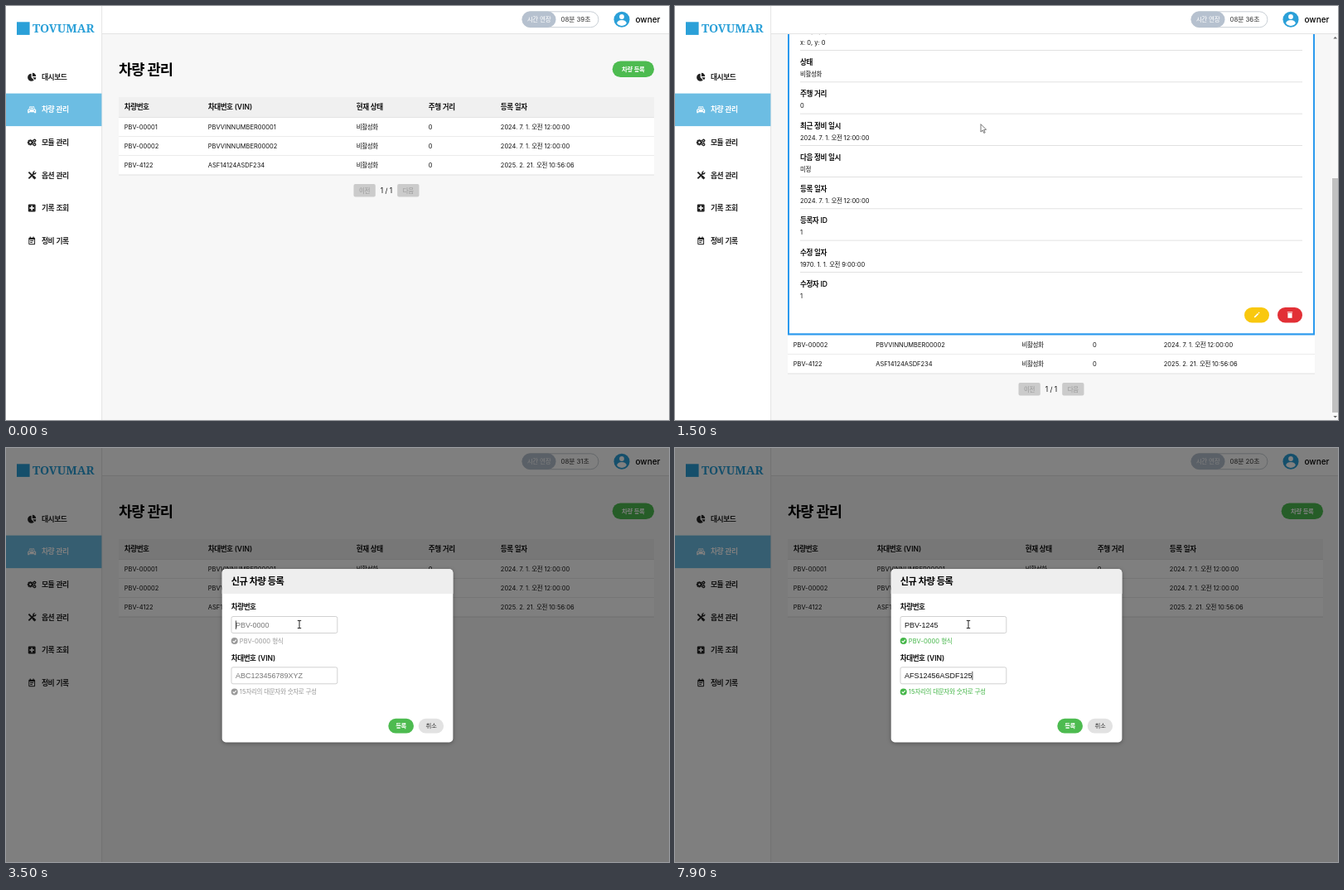
An HTML page with a canvas that plays this animation: 800 px wide and 500 px high, repeating every 8 s.

```html
<!DOCTYPE html>
<html lang="ko">
<head>
<meta charset="utf-8">
<title>차량 관리</title>
<style>
html, body { margin: 0; width: 100%; height: 100%; overflow: hidden; background: #f7f7f7; }
canvas { display: block; width: 800px; height: 500px; }
</style>
</head>
<body>
<canvas id="stage"></canvas>
<script>
const canvas = document.getElementById('stage');
const ctx = canvas.getContext('2d');
const ratio = window.devicePixelRatio || 1;
canvas.width = 800 * ratio;
canvas.height = 500 * ratio;

const LOOP = 8000, STEP = 100;
const UI = 'Inter, "Noto Sans CJK KR", "Noto Sans CJK", sans-serif';
const FIELD = '"Liberation Sans", Arial, sans-serif';
const BLUE = '#2ba0d8', GREEN = '#4dbb50', INK = '#111';

// Event times in ms
const OPEN_ROW = 400, RELOAD = 1800, MODAL = 2500;
const FOCUS = 3500, TAB = 5900;
const PLATE = 'PBV-1245', VIN = 'AFS12456ASDF125';
const plateKeys = [3800, 4600, 4800, 5200, 5300, 5400, 5500, 5700];
const vinKeys = [6100, 6200, 6400, 6500, 6700, 6900, 7000, 7100, 7100, 7200, 7300, 7400, 7600, 7700, 7800];
const earlyTicks = [500, 900, 1300, 1700, 1900, 2300];

const scrollKeys = [[500, 0], [600, 15], [700, 59.5], [800, 150], [900, 235], [1000, 272]];
const pointerKeys = [
  [100, 60, 128], [300, 540, 144.5], [1200, 540, 150], [1400, 520, 150], [1700, 67, 128],
  [1800, 67, 128], [2000, 420, 154], [2200, 748, 79.5], [2600, 748, 79.5], [3100, 400, 200],
  [3200, 400, 200], [3400, 354, 213]
];

const rows = [
  ['PBV-00001', 'PBVVINNUMBER00001', '비활성화', '0', '2024. 7. 1. 오전 12:00:00'],
  ['PBV-00002', 'PBVVINNUMBER00002', '비활성화', '0', '2024. 7. 1. 오전 12:00:00'],
  ['PBV-4122', 'ASF14124ASDF234', '비활성화', '0', '2025. 2. 21. 오전 10:56:06']
];
const heads = ['차량번호', '차대번호 (VIN)', '현재 상태', '주행 거리', '등록 일자'];
const columns = [0, 0.1563, 0.4334, 0.568, 0.7028];
const details = [
  ['차량 ID', '1'], ['차량번호', 'PBV-00001'], ['차대번호 (VIN)', 'PBVVINNUMBER00001'],
  ['현재 위치', 'x: 0, y: 0'], ['상태', '비활성화'], ['주행 거리', '0'],
  ['최근 정비 일시', '2024. 7. 1. 오전 12:00:00'], ['다음 정비 일시', '미정'],
  ['등록 일자', '2024. 7. 1. 오전 12:00:00'], ['등록자 ID', '1'],
  ['수정 일자', '1970. 1. 1. 오전 9:00:00'], ['수정자 ID', '1']
];

const countPast = (times, t) => times.filter(k => k <= t).length;

function sample(keys, t) {
  if (t <= keys[0][0]) return keys[0].slice(1);
  for (let i = 1; i < keys.length; i++) {
    const [a, ...from] = keys[i - 1], [b, ...to] = keys[i];
    if (t <= b) return from.map((v, j) => v + (to[j] - v) * (t - a) / (b - a));
  }
  return keys[keys.length - 1].slice(1);
}

function rect(x, y, w, h, fill) {
  ctx.fillStyle = fill;
  ctx.fillRect(x, y, w, h);
}

function box(x, y, w, h, r, fill, stroke) {
  ctx.beginPath();
  ctx.roundRect(x, y, w, h, r);
  if (fill) { ctx.fillStyle = fill; ctx.fill(); }
  if (stroke) { ctx.strokeStyle = stroke; ctx.lineWidth = 0.8; ctx.stroke(); }
}

function dot(x, y, r, fill) {
  ctx.beginPath();
  ctx.arc(x, y, r, 0, Math.PI * 2);
  ctx.fillStyle = fill;
  ctx.fill();
}

function line(points, color, width) {
  ctx.beginPath();
  points.forEach(([x, y]) => ctx.lineTo(x, y));
  ctx.strokeStyle = color;
  ctx.lineWidth = width;
  ctx.stroke();
}

// Hangul runs are set slightly tighter than Latin ones
function text(str, x, y, size, { weight = 400, color = INK, center = false, font = UI } = {}) {
  ctx.font = `${weight} ${size}px ${font}`;
  ctx.fillStyle = color;
  const runs = str.match(/[가-힣]+|[^가-힣]+/g) || [];
  const widths = runs.map(run => {
    ctx.letterSpacing = (/[가-힣]/.test(run) ? -0.055 * size : 0) + 'px';
    return ctx.measureText(run).width;
  });
  const total = widths.reduce((a, b) => a + b, 0);
  if (center) x -= total / 2;
  runs.forEach((run, i) => {
    ctx.letterSpacing = (/[가-힣]/.test(run) ? -0.055 * size : 0) + 'px';
    ctx.fillText(run, x, y + size * 0.36);
    x += widths[i];
  });
  ctx.letterSpacing = '0px';
  return total;
}

function at(x, y, draw) {
  ctx.save();
  ctx.translate(x, y);
  draw();
  ctx.restore();
}

function gear(x, y, r) {
  for (let i = 0; i < 8; i++) {
    const a = i * Math.PI / 4;
    line([[x, y], [x + Math.cos(a) * r, y + Math.sin(a) * r]], '#222', r * 0.5);
  }
  dot(x, y, r * 0.75, '#222');
  dot(x, y, r * 0.33, '#fff');
}

const icons = [
  () => {
    ctx.fillStyle = '#222';
    ctx.beginPath();
    ctx.moveTo(-0.6, 0.6);
    ctx.arc(-0.6, 0.6, 4.5, Math.PI * 0.25, Math.PI * 1.5);
    ctx.fill();
    ctx.beginPath();
    ctx.moveTo(0.7, -0.6);
    ctx.arc(0.7, -0.6, 4.3, -Math.PI / 2, 0);
    ctx.fill();
    ctx.beginPath();
    ctx.moveTo(0.9, 0.6);
    ctx.arc(0.9, 0.6, 4.2, 0, Math.PI * 0.25);
    ctx.fill();
  },
  () => {
    ctx.beginPath();
    [[-5, 0], [-3.7, -0.8], [-2.7, -4], [2.7, -4], [3.7, -0.8], [5, 0], [5, 4], [3, 4], [3, 3], [-3, 3], [-3, 4], [-5, 4]]
      .forEach(p => ctx.lineTo(...p));
    ctx.fillStyle = '#fff';
    ctx.fill();
    line([[-2.5, -0.8], [-1.9, -2.9], [1.9, -2.9], [2.5, -0.8], [-2.5, -0.8]], '#6cbde3', 0.8);
    dot(-3.1, 1.2, 0.8, '#6cbde3');
    dot(3.1, 1.2, 0.8, '#6cbde3');
  },
  () => { gear(-1.8, 0, 3.6); gear(3.2, -2.2, 2.1); gear(3.2, 2.4, 2.1); },
  () => {
    line([[-3.8, 4], [3.3, -3.1]], '#222', 1.8);
    line([[-3.8, -3.8], [4, 4]], '#222', 1.8);
    line([[1.4, 1.4], [4.2, 4.2]], '#222', 2.8);
    dot(3.1, -3, 2.1, '#222');
    line([[2.8, -2.8], [5.5, -5.5]], '#fff', 1.4);
  },
  () => {
    box(-4.4, -4.4, 8.8, 8.8, 1.2, '#222');
    rect(-2.8, -0.8, 5.6, 1.6, '#fff');
    rect(-0.8, -2.8, 1.6, 5.6, '#fff');
  },
  () => {
    box(-3.9, -3.8, 7.8, 8.4, 1, '#222');
    rect(-2.9, -1.5, 5.8, 5.1, '#fff');
    rect(-2.5, -5, 1.2, 2, '#222');
    rect(1.3, -5, 1.2, 2, '#222');
    rect(-2, -0.6, 4, 1, '#222');
    rect(-2, 1.4, 2.7, 1, '#222');
  }
];

function drawSidebar() {
  rect(0, 0, 115.5, 500, '#fff');
  rect(115.3, 0, 0.8, 500, '#dedede');
  rect(13, 19.3, 15.6, 15.6, BLUE);
  text('TOVUMAR', 32, 26.6, 14.2, { weight: 700, color: BLUE, font: '"Noto Serif", serif' });
  ['대시보드', '차량 관리', '모듈 관리', '옵션 관리', '기록 조회', '정비 기록'].forEach((name, i) => {
    const y = 85.6 + i * 39.6, active = i === 1;
    if (active) rect(0, 105.6, 115.4, 39.5, '#6cbde3');
    at(31.2, y, icons[i]);
    text(name, 43, y, 8.8, { weight: active ? 700 : 600, color: active ? '#fff' : '#222' });
  });
}

function drawTopbar(seconds) {
  rect(116, 0, 684, 33.3, '#fff');
  rect(116, 33, 684, 0.9, '#e2e2e2');
  box(622.9, 6.8, 92, 18.9, 9.5, '#fff', '#bcc3cb');
  box(622.7, 6.6, 40.8, 19.3, 9.6, '#b6c1cf');
  text('시간 연장', 643, 16.2, 7.6, { color: '#fff', center: true });
  text(`08분 ${seconds}초`, 669.5, 16.2, 7.9, { color: '#333' });
  dot(743, 16.2, 9.5, BLUE);
  dot(743, 13, 2.9, '#fff');
  ctx.beginPath();
  ctx.ellipse(743, 20.4, 5.7, 3.5, 0, 0, Math.PI * 2);
  ctx.fillStyle = '#fff';
  ctx.fill();
  text('owner', 759.5, 16.2, 10, { weight: 500, color: '#000' });
}

function drawCells(cells, y, width, size, weight) {
  cells.forEach((cell, i) => text(cell, 142.8 + columns[i] * width, y, size, { weight }));
}

function drawDetails(width) {
  const right = 136 + width, top = 134.5;
  rect(136, top, width, 535, '#2b9aee');
  rect(138, top + 24.8, width - 4, 508, '#fff');
  text('PBV-00001', 142.8, 145.9, 7.5, { weight: 600, color: '#fff' });
  details.forEach(([label, value], i) => {
    const y = 187 + i * 38.25;
    text(label, 151, y, 8.6, { weight: 600 });
    text(value, 151, y + 14.5, 7.5);
    if (i < details.length - 1) rect(151, y + 23.5, right - 166, 0.7, '#d5d5d5');
  });
  box(687, 636, 30, 18.4, 9.2, '#f9c80e');
  box(727, 636, 30, 18.4, 9.2, '#e23036');
  line([[699.2, 648], [703.6, 643.6]], '#fff', 1.7);
  line([[704.2, 643], [705, 642.2]], '#fff', 1.7);
  rect(739.4, 642.8, 5.2, 6, '#fff');
  rect(738.8, 641.4, 6.4, 0.9, '#fff');
}

function drawPage(open, scroll, hover) {
  const width = open ? 636 : 646, right = 136 + width, shift = open ? 512 : 0;
  ctx.save();
  ctx.beginPath();
  ctx.rect(116, 34, 684, 466);
  ctx.clip();
  ctx.translate(0, -scroll);
  text('차량 관리', 136, 76.2, 17.6, { weight: 700, color: '#000' });
  box(right - 50.3, 66.4, 50.3, 19.6, 9.8, hover ? '#4aa84c' : GREEN);
  text('차량 등록', right - 25.2, 76.2, 7.4, { weight: 600, color: '#fff', center: true });

  rect(136, 110, width, 24.4, '#f0f0f0');
  drawCells(heads, 122, width, 8.6, 600);
  rows.forEach((row, i) => {
    const y = 134.4 + i * 23.2 + (i ? shift : 0);
    rect(136, y, width, 23.2, '#fff');
    rect(136, y + 22.8, width, 0.8, '#d9d9d9');
    drawCells(row, y + 11.6, width, 7.5, 400);
  });
  rect(136, 134, width, 0.7, '#dcdcdc');
  if (open) drawDetails(width);

  const mid = 136 + width / 2, y = 222.8 + shift;
  [['이전', -39.5], ['다음', 13.2]].forEach(([name, dx]) => {
    box(mid + dx, y - 7.7, 26.3, 15.4, 2, '#cbcbcb');
    text(name, mid + dx + 13.1, y, 7.5, { color: '#999', center: true });
  });
  text('1 / 1', mid, y, 8.4, { center: true });
  ctx.restore();

  if (open) {
    rect(792, 34, 8, 466, '#f8f8f8');
    box(793, 43 + scroll * 448 / 738, 7, 283, 0, '#c1c1c1');
    ctx.fillStyle = '#666';
    [[38.5, -1], [496, 1]].forEach(([y, d]) => {
      ctx.beginPath();
      ctx.moveTo(794.4, y - d);
      ctx.lineTo(799, y - d);
      ctx.lineTo(796.7, y + d * 1.4);
      ctx.fill();
    });
  }
}

function drawField(y, label, hint, value, sample, full, focused) {
  text(label, 271.8, y - 21.3, 8.6, { weight: 600 });
  box(272, y - 10, 127.8, 20, 2, '#fff', '#c6c6c6');
  const w = text(value || sample, 277, y, 9, { font: FIELD, color: value ? '#111' : '#777' });
  if (focused) rect(277 + (value ? w : 0), y - 5, 0.7, 10.4, '#000');

  const ok = value.length === full;
  const color = !value ? '#999' : ok ? '#45b649' : '#d93a35';
  const cy = y + 19.6;
  dot(275.7, cy, 4, color);
  if (value && !ok) {
    line([[274.2, cy - 1.5], [277.2, cy + 1.5]], '#fff', 1.1);
    line([[277.2, cy - 1.5], [274.2, cy + 1.5]], '#fff', 1.1);
  } else {
    line([[273.7, cy], [275.2, cy + 1.5], [277.8, cy - 1.4]], '#fff', 1.1);
  }
  text(hint, 281.8, cy, 7.6, { color });
}

function drawModal(t) {
  rect(0, 0, 800, 500, 'rgba(0,0,0,.5)');
  ctx.save();
  ctx.shadowColor = 'rgba(0,0,0,.35)';
  ctx.shadowBlur = 5 * ratio;
  ctx.shadowOffsetY = ratio;
  box(260.7, 146.2, 278.7, 209.2, 4.5, '#fff');
  ctx.restore();
  box(260.7, 146.2, 278.7, 29.8, [4.5, 4.5, 0, 0], '#eee');
  text('신규 차량 등록', 271.8, 161.2, 11.2, { weight: 700, color: '#000' });
  const plate = PLATE.slice(0, countPast(plateKeys, t));
  const vin = VIN.slice(0, countPast(vinKeys, t));
  drawField(213.5, '차량번호', 'PBV-0000 형식', plate, 'PBV-0000', 8, t >= FOCUS && t < TAB);
  drawField(274.8, '차대번호 (VIN)', '15자리의 대문자와 숫자로 구성', vin, 'ABC123456789XYZ', 15, t >= TAB);
  box(461.3, 326.8, 30.7, 17.8, 8.9, GREEN);
  text('등록', 476.6, 335.7, 7.4, { weight: 600, color: '#fff', center: true });
  box(497.7, 326.8, 30.4, 17.8, 8.9, '#e2e2e2');
  text('취소', 512.9, 335.7, 7.4, { weight: 400, color: '#333', center: true });
}

function outline(points, edge) {
  ctx.beginPath();
  points.forEach(p => ctx.lineTo(...p));
  ctx.closePath();
  ctx.lineJoin = 'round';
  ctx.fillStyle = '#fff';
  ctx.fill();
  ctx.strokeStyle = edge;
  ctx.lineWidth = 0.8;
  ctx.stroke();
}

const cursors = {
  arrow: () => outline([[0, 0], [0, 9.4], [2.2, 7.4], [3.8, 10.8], [5.2, 10.1], [3.7, 6.9], [6.6, 6.6]], '#555'),
  hand: () => {
    outline([[-0.7, 0], [0.8, 0], [1.1, 4.2], [4.8, 5.2], [5.7, 6.4], [5, 10.2], [4.4, 12.4], [-0.6, 12.4],
      [-3.3, 8.8], [-3.6, 7.5], [-2.6, 7.2], [-0.9, 8.6]], '#444');
    line([[2.3, 4.6], [2.3, 6.5]], '#666', 0.6);
    line([[3.9, 5], [3.9, 6.7]], '#666', 0.6);
  },
  beam: () => [['#fff', 2.2], ['#222', 1]].forEach(([color, w]) => {
    line([[0, -4.5], [0, 4.5]], color, w);
    [-4.6, 4.6].forEach(y => line([[-2.2, y], [2.2, y]], color, w));
  })
};

function drawPointer(t) {
  if (t < 100) return;
  const [x, y] = sample(pointerKeys, t);
  let kind = 'arrow';
  if ((t >= 200 && t < 1000) || (t >= 1700 && t < 1900) || (t >= 2200 && t < MODAL)) kind = 'hand';
  if (t >= 3300) kind = 'beam';
  at(x, y, cursors[kind]);
}

function clock(t) {
  if (t < 2600) return 39 - countPast(earlyTicks, t);
  return 33 - Math.max(0, Math.floor((t - 2674) / 417) + 1);
}

function draw(t) {
  ctx.setTransform(ratio, 0, 0, ratio, 0, 0);
  rect(0, 0, 800, 500, '#f7f7f7');
  const open = t >= OPEN_ROW && t < RELOAD;
  drawPage(open, open ? sample(scrollKeys, t)[0] : 0, t >= 2200 && t < MODAL);
  drawTopbar(clock(t));
  drawSidebar();
  if (t >= MODAL) drawModal(t);
  drawPointer(t);
}

const start = performance.now();
function tick() {
  const t = (performance.now() - start) % LOOP;
  draw(Math.floor(t / STEP) * STEP);
  requestAnimationFrame(tick);
}
tick();
</script>
</body>
</html>
```
